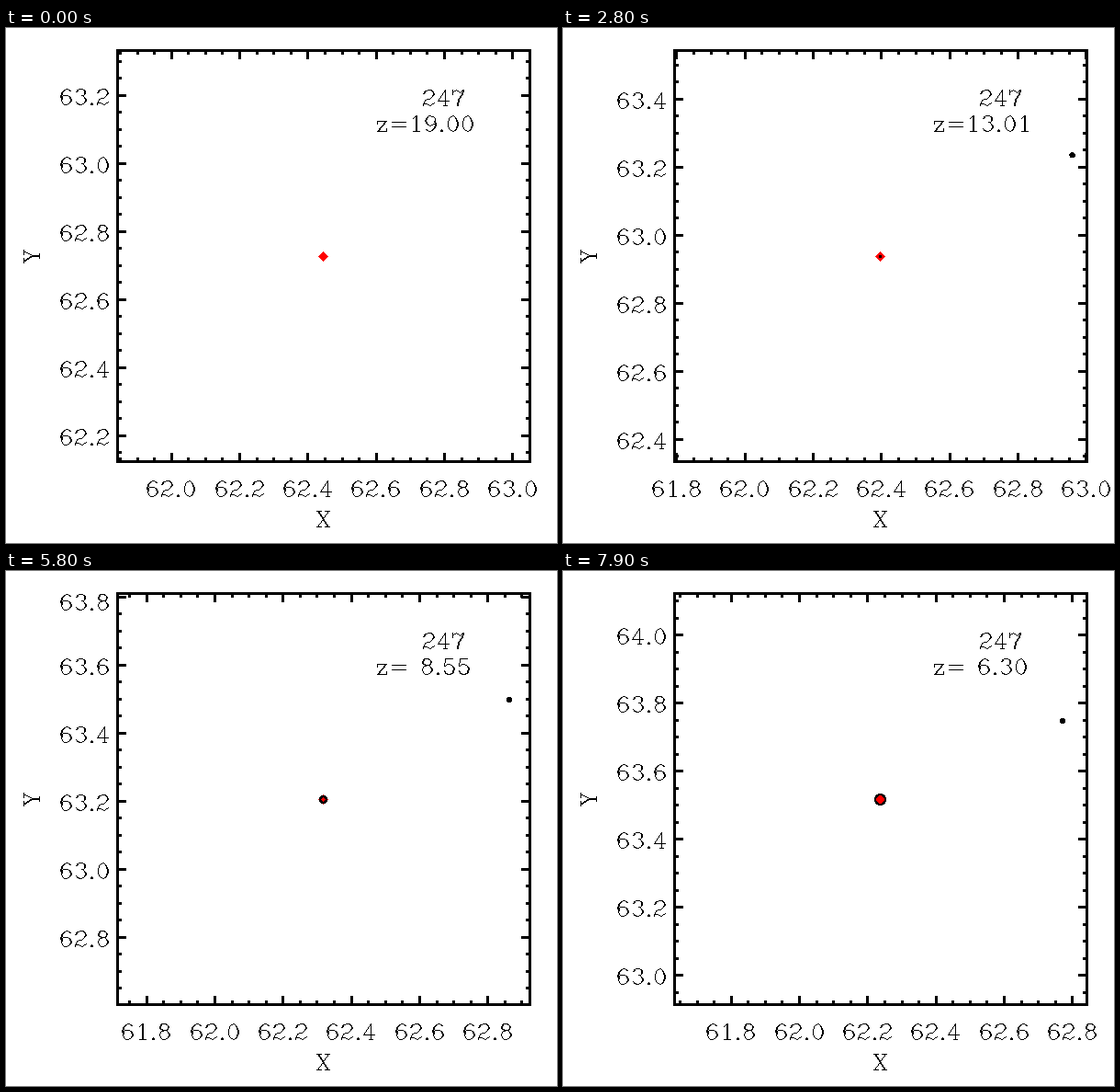
Recreate the animation shown at these times as a matplotlib script. Size 600 px wide and 560 px high, loop 8 s.

```python
import numpy as np
import matplotlib.pyplot as plt
from matplotlib.animation import FuncAnimation
from matplotlib.collections import LineCollection
from matplotlib.patches import Circle, Polygon, Rectangle

W, H, DPI = 600, 560, 100
FRAMES, STEP_MS = 80, 100
PX = 72 / DPI                       # one pixel in points
L, R, T, B = 121, 570, 24, 471      # plot box in pixels
SPAN = 1.208                        # data width of the window
CX, CY = (L + R) / 2, (T + B) / 2
SX, SY = (R - L) / SPAN, (B - T) / SPAN
UNIT = 0.8                          # pixels per glyph unit
CAP = 21                            # glyph units in a capital's height


# ---- stroke font: x to the right, y up from the baseline
def arc(cx, cy, rx, ry, a0=0, a1=360):
    a = np.radians(np.linspace(a0, a1, int(abs(a1 - a0) / 28) + 2))
    return list(zip(cx + rx * np.cos(a), cy + ry * np.sin(a)))


def bowl(cx, cy, rx, ry, a0=0, a1=360):
    """A curve with thick sides."""
    return [arc(cx, cy, rx, ry, a0, a1), arc(cx, cy, rx - 1, ry, a0, a1)]


def twin(*pts):
    """A thick straight stroke."""
    return [list(pts), [(x - 1, y) for x, y in pts]]


def serif(x, y=0, half=3):
    return [[(x - half, y), (x + half, y)]]


def turned(strokes):
    return [[(20 - x, CAP - y) for x, y in s] for s in strokes]


six = bowl(10, 6.5, 7, 6.5) + bowl(11, 10.5, 8, 10.5, 50, 200)
corners = serif(4, CAP) + serif(16, CAP)
GLYPHS = {
    " ": [],
    "0": bowl(10, 10.5, 7, 10.5),
    "1": twin((11, CAP), (11, 0)) + [[(6, 17), (11, CAP)]] + serif(10.5, 0, 4),
    "2": bowl(10, 16, 7, 5, 170, -30) + [[(16, 13.5)] + arc(10, 0, 7, 9, 80, 180),
                                         [(3, 2), (6, 3), (13, 0), (17, 4)]],
    "3": bowl(10, 16.5, 6.5, 4.5, 160, -80) + bowl(10, 6, 7, 6, 80, -160),
    "4": twin((13, CAP), (13, 0)) + [[(13, CAP), (2, 6), (18, 6)]] + serif(12.5),
    "5": bowl(10, 7, 7, 7, 140, -160) + [[(15, CAP), (5, CAP), (4, 11)]],
    "6": six,
    "7": twin((17, CAP), (16, 15), (11, 9), (10, 0))
         + [[(3, 15), (3, CAP)], [(3, 18), (7, CAP), (13, 18), (17, CAP)]],
    "8": bowl(10, 16.5, 6, 4.5) + bowl(10, 6, 7, 6),
    "9": turned(six),
    ".": [arc(5, 1, 1, 1)],
    "=": serif(13, 12, 9) + serif(13, 6, 9),
    "z": twin((15, 14), (4, 0)) + [[(3, 10), (3, 14), (15, 14)], [(3, 0), (15, 0), (15, 4)]],
    "X": twin((4, CAP), (17, 0)) + [[(17, CAP), (3, 0)]] + corners + turned(corners),
    "Y": twin((4, CAP), (11, 10), (11, 0)) + [[(18, CAP), (11, 10)]] + corners + serif(10.5),
}
WIDTHS = {" ": 16, ".": 10, "=": 26, "z": 19}


def trace(strokes):
    """Pixel offsets (right, up) of one-pixel-wide strokes."""
    dots = [np.zeros((0, 2))]
    for s in strokes:
        p = np.floor(np.array(s) * UNIT + 0.5)
        for a, b in zip(p, p[1:]):
            n = int(np.abs(b - a).max())
            dots.append(np.linspace(a, b, n + 1))
    return np.floor(np.concatenate(dots) + 0.5).astype(int).T


DOTS = {c: trace(s) for c, s in GLYPHS.items()}


def write(page, text, x, y, align=0.0, upright=True):
    """Put text on the page; align is 0 left, 0.5 centre, 1 right."""
    pen = -align * sum(WIDTHS.get(c, 20) for c in text)
    for c in text:
        right, up = DOTS[c]
        shift = pen * UNIT
        if upright:
            page[int(y + 0.5) - up, int(x + shift + 0.5) + right] = 0
        else:
            page[int(y - shift + 0.5) - right, int(x + 0.5) - up] = 0
        pen += WIDTHS.get(c, 20)


# ---- motion: key moments as frame, x, y, redshift
KEYS = np.array([
    (0, 62.446, 62.728, 19.00),
    (12, 62.426, 62.812, 16.15),
    (28, 62.3975, 62.938, 13.01),
    (39, 62.368, 63.037, 11.17),
    (58, 62.319, 63.206, 8.55),
    (71, 62.247, 63.419, 7.09),
    (79, 62.238, 63.518, 6.30),
])
frames = np.arange(FRAMES)
when, key_x, key_y, key_z = KEYS.T
main_x = np.interp(frames, when, key_x)
main_y = np.interp(frames, when, key_y)
redshift = np.expm1(np.interp(frames, when, np.log1p(key_z)))

# the neighbour drifts on a parabola, the ring grows steadily
SIDE_START, RING_START, RING_RATE = 25, 20, 0.09
side_x = np.polyval(np.polyfit([28, 58, 79], [62.960, 62.864, 62.772], 2), frames)
side_y = np.polyval(np.polyfit([28, 58, 79], [63.233, 63.497, 63.746], 2), frames)


# ---- stage
fig = plt.figure(figsize=(W / DPI, H / DPI), dpi=DPI, facecolor="white")
ax = fig.add_axes([0, 0, 1, 1])
ax.axis("off")

blank = np.ones((H, W))
write(blank, "X", CX - 0.5, 542, 0.5)
write(blank, "Y", 36, CY + 0.5, 0.5, upright=False)
write(blank, "247", 452, 84)
sheet = ax.imshow(blank, cmap="gray", vmin=0, vmax=1, interpolation="nearest",
                  extent=(0, W, H, 0), aspect="auto")

ax.add_patch(Rectangle((L + 0.5, T + 0.5), R - L, B - T, fill=False, ec="black",
                       lw=3 * PX, aa=False, joinstyle="miter", snap=False))
ticks = LineCollection([], colors="black", linewidths=3 * PX, antialiaseds=False,
                       snap=False)
ax.add_collection(ticks, autolim=False)

mx, my, d = CX, CY + 1, 5
ax.add_patch(Polygon([(mx - d, my), (mx, my - d), (mx + d, my), (mx, my + d)],
                     fc="red", ec="none", aa=False, zorder=3))
ring = Circle((mx, my), 1, fill=False, ec="black", lw=PX, aa=False, zorder=4)
side = Circle((0, 0), 2.6, fc="black", ec="none", aa=False, zorder=4)
ax.add_patch(ring)
ax.add_patch(side)
ax.set_xlim(0, W)
ax.set_ylim(H, 0)


def steps(mid):
    """Tick values every 0.05 in the window, their length, and if they are labelled."""
    lo, hi = mid - SPAN / 2, mid + SPAN / 2
    for k in range(int(np.ceil(lo * 20)), int(np.floor(hi * 20)) + 1):
        major = k % 4 == 0
        yield k / 20, 9.5 if major else 4.5, major


def draw(i):
    x0, y0 = main_x[i], main_y[i]
    page, marks = blank.copy(), []
    write(page, f"z={redshift[i]:5.2f}", 401.5, 112)

    for v, n, major in steps(x0):
        px = CX + (v - x0) * SX
        p = np.floor(px + 0.5) + 0.5
        marks += [[(p, B + 0.5), (p, B + 0.5 - n)], [(p, T + 0.5), (p, T + 0.5 + n)]]
        if major:
            write(page, f"{v:.1f}", px - 0.4, 509, 0.5)

    for v, n, major in steps(y0):
        py = CY - (v - y0) * SY
        p = np.floor(py + 0.5) + 0.5
        marks += [[(L + 0.5, p), (L + 0.5 + n, p)], [(R + 0.5, p), (R + 0.5 - n, p)]]
        if major:
            # end labels stay inside the height of the box
            write(page, f"{v:.1f}", 113, np.clip(py + 10, T + 18, B), 1)

    sheet.set_data(page)
    ticks.set_segments(marks)
    ring.set_radius(max(0, RING_RATE * (i - RING_START)))
    ring.set_visible(i > RING_START)
    side.center = CX + (side_x[i] - x0) * SX, CY - (side_y[i] - y0) * SY
    side.set_visible(i >= SIDE_START)
    return sheet, ticks, ring, side


anim = FuncAnimation(fig, draw, frames=FRAMES, interval=STEP_MS, repeat=True,
                     repeat_delay=0, blit=False)
plt.show()
```
